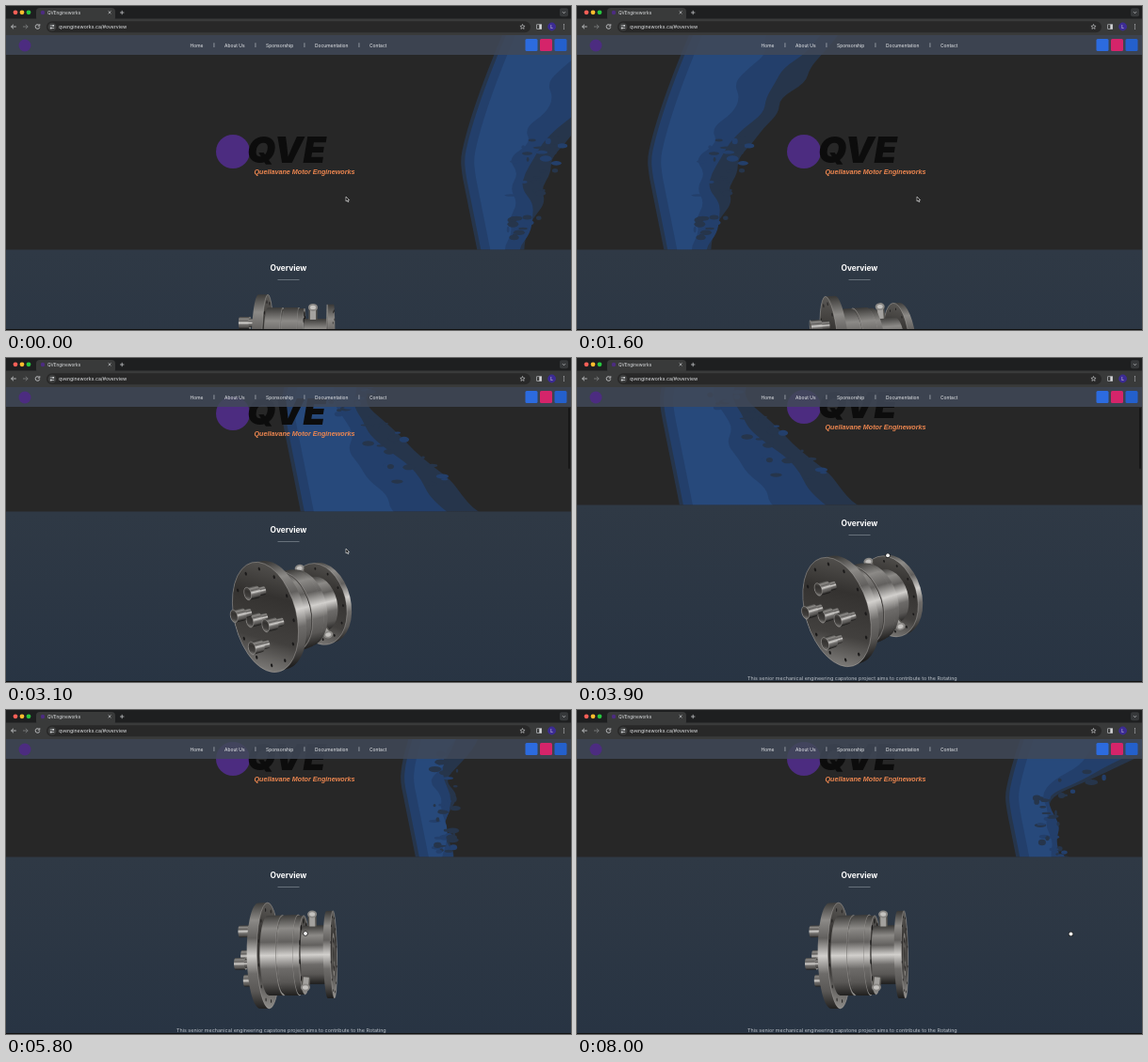
Animation, 600 px wide and 345 px high, one loop 8100 ms. Source, as an HTML page with a canvas:

```html
<!DOCTYPE html>
<html lang="en">
<head>
<meta charset="utf-8">
<title>QVEngineworks</title>
<style>
html, body { margin: 0; width: 100%; height: 100%; overflow: hidden; background: #111; }
canvas { display: block; width: 600px; height: 345px; }
</style>
</head>
<body>
<canvas id="stage"></canvas>
<script>
const W = 600, H = 345, LOOP = 8100, STEP = 100;
const canvas = document.getElementById('stage');
const ctx = canvas.getContext('2d');
const ratio = window.devicePixelRatio || 1;
canvas.width = W * ratio;
canvas.height = H * ratio;

const SANS = 'Inter, Roboto, sans-serif';
const BRAND = '#4c2c80';
const INK = '#d3d5d7';
const TAU = Math.PI * 2;

// ---------- helpers ----------
function rect(x, y, w, h, color, radius = 0) {
  ctx.fillStyle = color;
  ctx.beginPath();
  ctx.roundRect(x, y, w, h, radius);
  ctx.fill();
}

function dot(x, y, rx, color, ry = rx) {
  ctx.fillStyle = color;
  ctx.beginPath();
  ctx.ellipse(x, y, rx, ry, 0, 0, TAU);
  ctx.fill();
}

function text(str, x, y, size, color, style = '', align = 'left', family = SANS) {
  ctx.font = `${style} ${size}px ${family}`;
  ctx.textAlign = align;
  ctx.fillStyle = color;
  ctx.fillText(str, x, y);
}

function line(color, width, ...points) {
  ctx.strokeStyle = color;
  ctx.lineWidth = width;
  ctx.beginPath();
  for (const [x, y] of points) ctx.lineTo(x, y);
  ctx.stroke();
}

function clipped(x, y, w, h, draw) {
  ctx.save();
  ctx.beginPath();
  ctx.rect(x, y, w, h);
  ctx.clip();
  draw();
  ctx.restore();
}

// Closed shape, smoothed through the midpoints of its corners.
function blob(points, color) {
  const at = i => points[i % points.length];
  const mid = i => at(i).map((v, k) => (v + at(i + 1)[k]) / 2);
  ctx.fillStyle = color;
  ctx.beginPath();
  ctx.moveTo(...mid(0));
  for (let i = 1; i <= points.length; i++) ctx.quadraticCurveTo(...at(i), ...mid(i));
  ctx.fill();
}

function randomizer(seed) {
  return () => (seed = (seed * 16807) % 2147483647) / 2147483647;
}

const clamp = v => Math.max(0, Math.min(1, v));
const smooth = v => v * v * (3 - 2 * v);

// Rows are [time, ...values]; values ease from row to row.
function keyed(rows, t) {
  let i = 0;
  while (i < rows.length - 2 && t >= rows[i + 1][0]) i++;
  const a = rows[i], b = rows[i + 1];
  const k = smooth(clamp((t - a[0]) / (b[0] - a[0])));
  return a.slice(1).map((v, j) => v + (b[j + 1] - v) * k);
}

// ---------- blue waves drifting left behind the hero ----------
// Each front bends at its knee; up and foot widen it above and below.
const WAVE_SPEED = 255;
const WAVES = [
  { at: 0, x: 482, knee: 168, width: 95, up: 0.5, foot: -0.5, until: 5 },
  { at: 3.1, x: 291, knee: 150, width: 85, up: 0.05, foot: 1, until: 4.8 },
  { at: 5.8, x: 418, knee: 175, width: 55, up: 0.3, foot: -0.2, until: 7.1 },
  { at: 8, x: 454, knee: 198, width: 50, up: 2, foot: 0, until: 9 }
];
const WAVE_LAYERS = [
  { color: '#26354b', inset: 0, fill: 1 },
  { color: '#233f6b', inset: 4, fill: 0.8 },
  { color: '#27497b', inset: 14, fill: 0.45 }
];

function drawWave(wave, t, index) {
  const { knee } = wave;
  const x = wave.x - WAVE_SPEED * (t - wave.at);
  const front = y => x + (y < knee ? 45 * ((knee - y) / 137) ** 1.3 : 0.2 * (y - knee));
  const width = y => wave.width + (y < knee ? wave.up * (knee - y) : wave.foot * (y - knee));
  const random = randomizer(101 + 37 * index);

  ctx.globalAlpha = clamp((wave.until - t) / 0.6);
  for (const { color, inset, fill } of WAVE_LAYERS) {
    const left = [], right = [];
    for (let y = 18; y <= 274; y += 16) {
      left.push([front(y) + inset, y]);
      right.unshift([front(y) + inset + width(y) * fill + (random() - 0.5) * 20, y]);
    }
    blob([...left, ...right], color);
  }
  for (let i = 0; i < 36; i++) {
    const y = knee - 30 + random() * 110;
    const spread = 0.6 + random() * 0.5;
    dot(front(y) + width(y) * spread, y, 1 + random() * 6,
      i % 3 ? '#26354b' : '#233f6b', 1 + random() * 2.5);
  }
  ctx.globalAlpha = 1;
}

// ---------- engine: cylinders along one turning axis ----------
const CAMERA = 480;
const TURNS = [[0, -3, 0], [3.8, 42, 12], [4.8, -72, 50], [5.7, -9, 1]]; // time, yaw, pitch

function metal(r, cy) {
  const g = ctx.createLinearGradient(0, cy - r, 0, cy + r);
  ['#3b3a38', '#8c8a87', '#62605e', '#d2d0cd', '#6d6b69', '#595755', '#201f1e']
    .forEach((color, i) => g.addColorStop(i / 6, color));
  return g;
}

function drawEngine(t) {
  const [yaw, pitch] = keyed(TURNS, t).map(deg => deg * Math.PI / 180);
  const ax = Math.cos(yaw) * Math.cos(pitch);
  const ay = -Math.sin(pitch);
  const az = -Math.sin(yaw) * Math.cos(pitch);
  const flat = Math.hypot(ax, ay);
  const facing = az > 0;
  const zoom = s => 1 + s * az / CAMERA;
  const tilt = s => az - s * flat * flat / CAMERA;
  const place = (s, r, angle) => [
    (s * flat - tilt(s) * r * Math.cos(angle)) * zoom(s),
    r * Math.sin(angle) * zoom(s)
  ];

  function cap(s, r, x, y) {
    const ry = r * zoom(s), rx = ry * Math.abs(tilt(s));
    const face = ctx.createLinearGradient(x - rx, y + ry, x + rx, y - ry);
    ['#94928f', '#42403e', '#343230', '#5d5b58'].forEach((c, i) => face.addColorStop(i / 3, c));
    dot(x, y, rx, face, ry);
    ctx.strokeStyle = 'rgba(205,203,200,.5)';
    ctx.lineWidth = 0.6;
    ctx.stroke();
  }

  function tube(s0, s1, r, offset = 0, angle = 0) {
    const [x0, y0] = place(s0, offset, angle);
    const [x1, y1] = place(s1, offset, angle);
    const r0 = r * zoom(s0), r1 = r * zoom(s1);
    ctx.fillStyle = metal(r, y0);
    ctx.beginPath();
    ctx.ellipse(x0, y0, r0 * Math.abs(tilt(s0)), r0, 0, TAU / 4, TAU * 3 / 4);
    ctx.ellipse(x1, y1, r1 * Math.abs(tilt(s1)), r1, 0, -TAU / 4, TAU / 4);
    ctx.fill();
    if (tilt(s1) > 0) cap(s1, r, x1, y1);
    if (tilt(s0) < 0) cap(s0, r, x0, y0);
  }

  function holes(s, ring, count, r) {
    for (let i = 0; i < count; i++) {
      const [x, y] = place(s, ring, i * TAU / count + 0.2);
      dot(x, y, r * Math.max(Math.abs(tilt(s)), 0.25), '#1b1a1a', r);
    }
  }

  function fitting(s, r0, r1, angle) {
    const root = place(s, r0, angle), tip = place(s, r1, angle);
    line('#55534f', 9, root, tip);
    line('#a3a19e', 6, root, tip);
    dot(...tip, 5, '#8a8885', 4);
    dot(...tip, 3, '#c4c2bf', 2.2);
  }

  function port(offset, angle) {
    const stem = () => tube(-49, -40, 4.5, offset, angle);
    const nut = () => tube(-59, -48, 6.5, offset, angle);
    (facing ? [nut, stem] : [stem, nut]).forEach(draw => draw());
  }

  const parts = [
    () => {
      port(0, 0);
      for (let i = 0; i < 4; i++) port(28, 0.3 + i * TAU / 4);
    },
    () => {
      tube(-40, -30, 57);
      holes(facing ? -30 : -40, 50, 12, 2);
    },
    () => tube(-30, -14, 43),
    () => tube(-14, -12, 41),
    () => tube(-12, 3, 43),
    () => {
      tube(3, 9, 42);
      if (facing) holes(9, 36, 11, 3);
    },
    () => {
      tube(9, 33, 31);
      fitting(18, 30, 43, -TAU / 4);
      fitting(13, 30, 44, 0.9);
    },
    () => {
      tube(33, 40, 46);
      holes(facing ? 40 : 33, 40, 12, 1.4);
      if (tilt(40) > 0) {
        ['#7d7a76', '#2d2b2a', '#6f6c68', '#242322'].forEach((color, i) => {
          const r = 23 - 5 * i;
          dot(...place(40, 0, 0), r * tilt(40), color, r);
        });
      }
    }
  ];

  ctx.save();
  ctx.translate(308, 364);
  ctx.rotate(Math.atan2(ay, ax));
  (facing ? parts : parts.reverse()).forEach(draw => draw());
  ctx.restore();
}

// ---------- page ----------
const scrollAt = t => 96 * smooth(clamp((t - 2.7) / 0.4)) + 7 * clamp((t - 3.1) / 0.4);

function drawPage(t) {
  ctx.translate(0, -scrollAt(t));
  rect(0, 31, W, 229, '#272727');
  clipped(0, 31, W, 228.5, () => WAVES.forEach((wave, i) => drawWave(wave, t, i)));
  dot(241, 155, 18, BRAND);
  text('QVE', 256, 167, 39, '#0c0c0c', 'italic 900');
  text('Quellavane Motor Engineworks', 317, 179, 7.2, '#ee8750', 'italic bold', 'center', '"Liberation Sans", sans-serif');

  const section = ctx.createLinearGradient(0, 260, 0, 450);
  section.addColorStop(0, '#2f3945');
  section.addColorStop(1, '#283443');
  rect(0, 259.5, W, 220, section);
  text('Overview', 300, 282.2, 8.3, '#fff', 'bold', 'center');
  rect(288.5, 291, 23, 0.8, '#77808a');
  drawEngine(t);
  text('This senior mechanical engineering capstone project aims to contribute to the Rotating',
    292.3, 446.3, 5.45, '#bcc2c9', '', 'center');
}

function drawNav() {
  rect(0, 31, W, 21, 'rgba(64,73,88,.86)');
  dot(20, 42, 6.5, BRAND);
  const items = { 'Home': 195.5, 'About Us': 232, 'Sponsorship': 276, 'Documentation': 328, 'Contact': 386 };
  for (const [label, x] of Object.entries(items)) {
    text(label, x, 43.5, 4.95, '#eceef0');
    if (label !== 'Home') rect(x - 11.4, 39.3, 0.7, 4.8, '#b5bac1');
  }
  ['#2c6bdf', '#d5246a', '#2460cc'].forEach((color, i) => rect(551.5 + 15.5 * i, 35, 13, 13, color, 1.5));
}

function drawArrow(x, direction, color) {
  const head = x + 2.6 * direction;
  line(color, 0.8, [x - 2.6 * direction, 22], [head, 22]);
  line(color, 0.8, [head - 2.4 * direction, 19.7], [head, 22], [head - 2.4 * direction, 24.3]);
}

function drawBrowser() {
  rect(0, 0, W, 14, '#1e1f20');
  rect(0, 13.5, W, 17.5, '#393a3a');
  ['#ff5f57', '#febc2e', '#28c840'].forEach((color, i) => dot(10 + 7 * i, 6.8, 2.4, color));
  rect(32, 2, 84, 14, '#393a3a', 4);
  dot(39, 7, 2.2, BRAND);
  text('QVEngineworks', 44, 8.9, 4.7, '#dfe1e3');
  line(INK, 0.7, [108.7, 5.4], [111.5, 8.2]);
  line(INK, 0.7, [111.5, 5.4], [108.7, 8.2]);
  line(INK, 0.7, [121, 7], [125.4, 7]);
  line(INK, 0.7, [123.2, 4.8], [123.2, 9.2]);
  rect(588, 2.3, 9, 9, '#36383a', 2);
  line(INK, 0.7, [591, 6.2], [592.5, 7.7], [594, 6.2]);

  rect(43, 16.2, 514, 12, '#282828', 6);
  drawArrow(8.2, -1, INK);
  drawArrow(20.6, 1, '#818385');
  ctx.strokeStyle = INK;
  ctx.beginPath();
  ctx.arc(33.5, 22, 2.3, 0.2, 5.4);
  ctx.stroke();
  line(INK, 0.8, [35.8, 19.2], [35.8, 21.2], [33.8, 21.2]);

  dot(49, 22.2, 4.4, '#3d3e3e');
  for (const side of [-1, 1]) {
    const y = 22.2 + 1.3 * side;
    line(INK, 0.7, [46.8, y], [51.2, y]);
    dot(49 - 1.2 * side, y, 0.9, INK);
  }
  text('qvengineworks.ca/#overview', 56, 24, 5.2, '#e4e6e8');

  const star = Array.from({ length: 11 }, (_, i) => {
    const r = i % 2 ? 1.2 : 2.7, angle = i * TAU / 10 - TAU / 4;
    return [548.5 + r * Math.cos(angle), 22.2 + r * Math.sin(angle)];
  });
  line(INK, 0.6, ...star);
  ctx.strokeRect(563.7, 19.8, 5, 4.6);
  rect(566.3, 19.8, 2.4, 4.6, INK);
  dot(579.6, 22, 4.4, '#3c2b94');
  text('L', 579.6, 23.8, 4.8, '#eee', '', 'center');
  for (let i = -1; i <= 1; i++) dot(592.5, 22 + 2.1 * i, 0.6, INK);
}

// ---------- cursor: an arrow that becomes a grabbing hand ----------
const CURSOR = [[3.2, 361, 203], [4.8, 285, 221], [5.8, 318, 238], [7.2, 462, 256.5], [8, 524.5, 238.5]];

function drawCursor(t) {
  const [x, y] = keyed(CURSOR, t);
  if (t > 3.5) {
    dot(x, y, 2.6, '#151515');
    dot(x, y, 2, '#f4f4f4');
    return;
  }
  ctx.beginPath();
  for (const [dx, dy] of [[0, 0], [0, 5], [1.2, 4], [2, 5.8], [2.9, 5.4], [2.1, 3.7], [3.6, 3.6]]) {
    ctx.lineTo(x + dx, y + dy);
  }
  ctx.closePath();
  ctx.fillStyle = '#111';
  ctx.fill();
  ctx.strokeStyle = '#eee';
  ctx.lineWidth = 0.6;
  ctx.stroke();
}

function render(now) {
  const t = Math.floor((now % LOOP) / STEP) * STEP / 1000;
  ctx.setTransform(ratio, 0, 0, ratio, 0, 0);
  rect(0, 0, W, H, '#111');
  clipped(0, 31, W, 313, () => drawPage(t));
  drawNav();
  if (t > 2.7 && t < 4) rect(597, 53, 2, 65, 'rgba(18,18,18,.75)', 1);
  drawBrowser();
  drawCursor(t);
}

const start = performance.now();
function tick() {
  render(performance.now() - start);
  requestAnimationFrame(tick);
}
tick();
</script>
</body>
</html>
```
